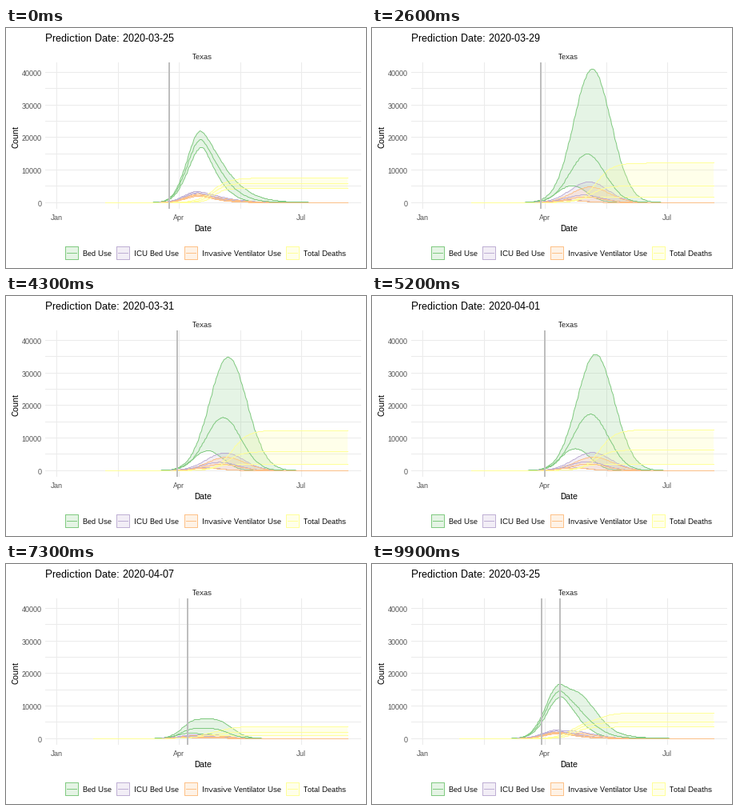
A matplotlib script that plays this animation: 450 by 300 pixels, repeating every 10000 ms.

```python
import numpy as np
import matplotlib.pyplot as plt
from matplotlib.animation import FuncAnimation
from matplotlib.patches import Rectangle

W, H, DPI = 450, 300, 100
PX = 72 / DPI                      # one pixel in points
FRAMES, INTERVAL = 100, 100
plt.rcParams.update({
    "font.family": "Liberation Sans",
    "text.hinting": "native",
    "text.hinting_factor": 1,
})

COLORS = ["#7FC97F", "#BEAED4", "#FDC086", "#FFFF99"]
LABELS = ["Bed Use", "ICU Bed Use", "Invasive Ventilator Use", "Total Deaths"]
LEFT, RIGHT, TOP, BOTTOM = 49, 444, 43, 226
LAST_DAY, POINTS = 216, 215        # days are counted from 1 January


def day_x(day):
    return 63.5 + 1.683 * day


def count_y(n):
    return 218.2 - 4.065e-3 * n


# --- forecasts -------------------------------------------------------------
def bell(t, peak, day, left, right, power):
    d = t - day
    rise = (np.maximum(-d, 0) / left) ** 2
    fall = (np.maximum(d, 0) / right) ** power
    return peak * np.exp(-0.5 * (rise + fall))


def logistic(t, top, mid, spread):
    return top / (1 + np.exp((mid - t) / spread))


class Forecast:
    """Upper, mean and lower curves of the four measures.

    Lower curves peak `shift` days earlier and are narrower for it; `taper`
    shortens their fall further. Deaths follow the bed peak by `lag` days.
    """

    def __init__(self, beds, deaths, day, shift, left, right, lag,
                 icu=0.155, start=36, power=2, taper=0):
        self.t = t = np.linspace(start, LAST_DAY, POINTS)
        curves = []
        for k, (peak, dead) in enumerate(zip(beds, deaths)):
            early = shift * (k / 2) ** 2
            mid, l = day - early, left - 0.2 * early
            r = (right - 0.2 * early) * (1 - taper * k / 2)
            curves.append([
                bell(t, peak, mid, l, r, power),
                bell(t, peak * icu, mid - 2.5, l, r, power),
                bell(t, peak * icu * 0.75, mid - 1.5, l, r, power),
                logistic(t, dead, mid + lag, 0.42 * r)])
        self.values = np.array(curves).swapaxes(0, 1)


def surge(n, top):
    """The wide forecast as it stood n days before 1 April."""
    return Forecast((top, 17300 - 800 * n, 6700 - 500 * n),
                    (12500 - 125 * n, 6300 - 400 * n, 1900 - 75 * n),
                    128.3 - 0.8 * n, 15, 13.7, 13.9, lag=3)


first = Forecast((22000, 19400, 17000), (7500, 5900, 4300), 107, -1,
                 10, 14.3, lag=9, power=1.45, taper=0.37)
low = Forecast((7600, 4000, 2100), (3300, 1850, 1000), 109, 6,
               9.5, 14, lag=5, icu=0.2)
rising = Forecast((10800, 5500, 2500), (4500, 2500, 1000), 110, 8,
                  9, 11, lag=4, icu=0.2, start=2)
late = Forecast((11100, 3800, 1250), (6430, 2560, 700), 123, 20,
                13, 12.5, lag=8, icu=0.2, start=2)
steep = Forecast((17000, 5200, 2000), (8700, 2300, 1100), 107, 8,
                 8.5, 12.5, lag=15, icu=0.18, start=2)

# prediction day and its forecast
STATES = [(84, first), (85, first), (86, first), (88, surge(3, 41000)),
          (89, surge(2, 34400)), (90, surge(1, 35000)), (91, surge(0, 35700)),
          (95, low), (97, low), (98, rising), (100, late), (102, steep)]
STEPS = 4


def date_text(day):
    month, d = (3, day - 59) if day < 91 else (4, day - 90)
    return f"2020-{month:02d}-{d:02d}"


def phase(frame):
    """Index of the current state and the progress towards the next."""
    for i in range(len(STATES)):
        step = frame - (5 + 8 * i + min(i, 4)) + 1
        if step < STEPS:
            return i, max(step, 0) / STEPS
    return 0, 0.0


# --- fixed parts -----------------------------------------------------------
fig = plt.figure(figsize=(W / DPI, H / DPI), dpi=DPI, facecolor="white")
ax = fig.add_axes([0, 0, 1, 1])
ax.set_xlim(0, W)
ax.set_ylim(H, 0)
ax.axis("off")


def rect(x, y, w, h, color, z, **kw):
    return ax.add_patch(Rectangle((x, y), w, h, fc=color, lw=0, zorder=z,
                                  antialiased=False, **kw))


def label(x, y, s, size, color="black", ha="left", **kw):
    return ax.text(x, y, s, fontsize=size * PX, color=color, ha=ha,
                   va=kw.pop("va", "baseline"), **kw)


def stroke(x, y, color, z):
    """One-pixel line on whole pixels."""
    return ax.plot(x, y, color=color, lw=0.98 * PX, zorder=z, snap=True,
                   solid_capstyle="projecting")[0]


for n in range(0, 45000, 5000):
    y = int(count_y(n))
    rect(LEFT, y, RIGHT - LEFT, 1, "#EBEBEB", 1)
    if n % 10000 == 0:
        label(44.5, y + 5, str(n), 9, "#4D4D4D", "right")
for i, name in enumerate(["Jan", "", "Apr", "", "Jul"]):
    x = int(day_x(45.5 * i))
    rect(x, TOP, 1, BOTTOM - TOP, "#EBEBEB", 1)
    label(x, 240, name, 9, "#4D4D4D", "center")
label(245, 39, "Texas", 9, "#1A1A1A", "center")
label(246, 254, "Date", 11, ha="center")
label(12, 136, "Count", 11, ha="center", va="center", rotation=90)

for x, color, name in zip((74, 138, 223, 350), COLORS, LABELS):
    rect(x, 273, 17, 17, color, 2, alpha=0.2)
    stroke([x, x + 16, x + 16, x, x], [273, 273, 289, 289, 273], color, 3)
    stroke([x + 2, x + 14], [281, 281], color, 3)
    label(x + 22, 285, name, 9)

# --- moving parts ----------------------------------------------------------
title = label(49, 17, "", 13)
bands = [ax.fill([0, 0, 0], [0, 0, 0], fc=c, alpha=0.2, lw=0, zorder=4 + i / 10)[0]
         for i, c in enumerate(COLORS)]
edges = [[stroke([], [], c, z + i / 10) for z in (4.05, 5, 4.05)]
         for i, c in enumerate(COLORS)]
marker = rect(0, TOP, 2, BOTTOM - TOP, "#BEBEBE", 6)
leftover = rect(0, TOP, 2, BOTTOM - TOP, "#BEBEBE", 6)


def place(bar, day):
    bar.set_x(np.floor(day_x(day)) - 1)


def draw(frame):
    i, p = phase(frame)
    j = (i + 1) % len(STATES)
    (day_a, a), (day_b, b) = STATES[i], STATES[j]

    title.set_text("Prediction Date: " + date_text(day_b if p > 0.5 else day_a))
    place(marker, day_a + (day_b - day_a) * p)
    # the last state's marker lingers while the loop returns to its start
    place(leftover, day_a)
    leftover.set_visible(p > 0 and j == 0)

    x = day_x(a.t + (b.t - a.t) * p)
    ys = count_y(a.values + (b.values - a.values) * p)
    for band, lines, y in zip(bands, edges, ys):
        band.set_xy(np.column_stack([np.r_[x, x[::-1]],
                                     np.r_[y[0], y[2][::-1]]]))
        for line, curve in zip(lines, y):
            line.set_data(x - 0.5, curve - 0.5)   # snapping rounds up
    return [title, marker, leftover, *bands, *sum(edges, [])]


anim = FuncAnimation(fig, draw, frames=FRAMES, interval=INTERVAL,
                     init_func=lambda: draw(0), repeat=True, repeat_delay=0)
plt.show()
```
